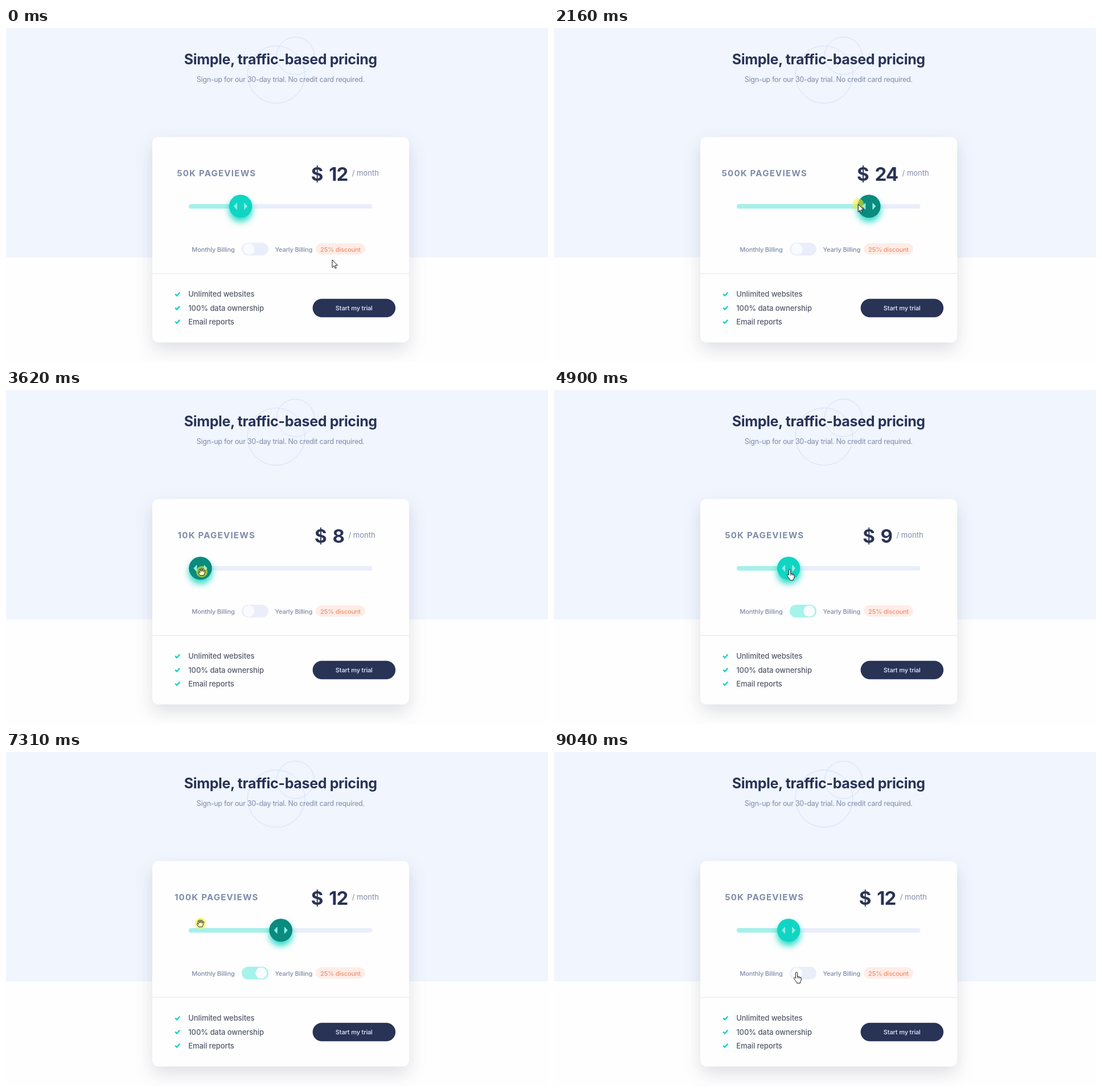
Write an HTML page that moves like this. It is 952x588 px and loops after 9700 ms.

```html
<!DOCTYPE html>
<html lang="en">
<head>
<meta charset="utf-8">
<title>Pricing slider</title>
<style>
  html, body { margin: 0; width: 100%; height: 100%; overflow: hidden; background: #fefefe; }
  svg { display: block; width: 952px; height: 588px; font-family: Inter, "Open Sans", sans-serif; }
  text { fill: #7f8baa; white-space: pre; }
  .mid { text-anchor: middle; }
  .title { font-size: 25px; font-weight: 700; letter-spacing: -.36px; fill: #293356; }
  .sub { font-size: 12.5px; letter-spacing: -.27px; }
  .views { font-size: 15px; font-weight: 700; letter-spacing: 1.25px; }
  .price { font-size: 33px; font-weight: 700; letter-spacing: -1px; word-spacing: 4px; fill: #293356; }
  .per { font-size: 13px; font-weight: 400; letter-spacing: 0; word-spacing: 0; fill: #7f8baa; }
  .small { font-size: 11px; font-weight: 500; letter-spacing: -.15px; }
  .feature { font-size: 13px; font-weight: 500; letter-spacing: -.09px; fill: #555a6b; }
  .ring { fill: none; stroke: #d6e0f4; }
  .check { fill: none; stroke: #10d5c2; stroke-width: 2.4; }
  .card { fill: #fefefe; filter: drop-shadow(0 13px 15px rgba(45, 52, 82, .15)); }
  #disc { fill: #10d5c2; filter: drop-shadow(0 7px 6px rgba(16, 213, 194, .9)); }
  #thumb path { fill: #8ceee4; }
  #thumb.down #disc { fill: #0b8a7e; }
  #cursor path { fill: #fff; stroke: #15171f; stroke-width: 1; stroke-linejoin: round; }
  #cursor #grab { fill: #fffcb8; stroke-width: .9; }
  #cursor .line { fill: none; stroke-width: .8; }
</style>
</head>
<body>
<svg viewBox="0 0 952 588">
  <rect width="952" height="588" fill="#fefefe"/>
  <rect width="952" height="404" fill="#f0f5fe"/>
  <circle class="ring" cx="474.5" cy="82" r="50.5"/>
  <circle class="ring" cx="508.3" cy="49" r="33"/>
  <text class="title mid" x="482.3" y="63.7">Simple, traffic-based pricing</text>
  <text class="sub mid" x="482.2" y="95">Sign-up for our 30-day trial. No credit card required.</text>

  <rect class="card" x="257" y="192" width="451" height="361.5" rx="10"/>
  <rect x="257" y="431.5" width="451" height="1.2" fill="#e8ebf1"/>

  <text class="views mid" id="views" x="369.8" y="261"></text>
  <text class="price mid" x="595.4" y="268.7"><tspan id="price"></tspan><tspan class="per" dx="7.5" dy="-9">/ month</tspan></text>

  <rect x="321" y="310" width="322.5" height="8" rx="4" fill="#eaeefb"/>
  <rect id="fill" x="321" y="310" height="8" rx="4" fill="#a5f1ea"/>
  <g id="thumb">
    <circle id="disc" r="20.3"/>
    <path d="M-12 0L-7 -5.6Q-6 -6 -6 -5V5Q-6 6 -7 5.6ZM12 0L7 -5.6Q6 -6 6 -5V5Q6 6 7 5.6Z"/>
  </g>

  <text class="small" x="326.3" y="393.6">Monthly Billing</text>
  <rect id="switch" x="414" y="378" width="47" height="22.6" rx="11.3"/>
  <circle id="knob" cy="389.3" r="10" fill="#fafbff"/>
  <text class="small" x="472.5" y="393.6">Yearly Billing</text>
  <rect x="544" y="379" width="87" height="20" rx="10" fill="#feece7"/>
  <text class="small mid" x="587.5" y="393.6" style="fill:#f0906c">25% discount</text>

  <g id="features"></g>
  <rect x="538.6" y="476.8" width="145.5" height="32.5" rx="16.2" fill="#293356"/>
  <text class="small mid" x="611.3" y="497" style="fill:#e6eeff">Start my trial</text>

  <g id="cursor">
    <circle id="press" r="10" fill="#fff01e" opacity=".56"/>
    <path id="arrow" d="M0 0V13.6L3.2 10.6 5.2 15.2 7.2 14.4 5.3 9.9H9.4Z"/>
    <g id="point">
      <path d="M-1.6 1.4a1.6 1.6 0 0 1 3.2 0V7.2l1.9 .4 1.8 .5 1.7 .6q1.6 .6 1.4 2.6l-.6 3.6-1.4 2.2V19H.6v-1.4l-2.6-3-2.6-4.2q-.4-1.6 1-1.8 1 0 2 1.6Z"/>
      <path class="line" d="M1.6 7v3.6M4 7.8v3M6.2 8.6v2.6"/>
    </g>
    <path id="grab" d="M-3.2 6.5L-6.2 1.8q-.4-1.6 1-1.6l2 1.9-1.6-5.2q0-1.6 1.5-1.4l1.8 4-.3-5q.8-1.4 1.9 0l.7 4.8 1-4.6q1.2-1 1.8 .4l-.4 5 1.5-2.8q1.5-.5 1.5 1l-1.8 5.2-1 3Z"/>
  </g>
</svg>
<script>
const LOOP = 9700, STEP = 70, FLIP = 220, LAG = 100, ARROW_END = 2300;
const TRACK = 341.5, GAP = 70.6;
const $ = id => document.getElementById(id);

const plans = [["10K", 8], ["50K", 12], ["100K", 16], ["500K", 24], ["1M", 36]];
const knobSpots = { thumb: [414, 316], off: [426, 388], on: [442, 390] };

// Where the pointer slows down: time, x, y.
const rests = [
  [700, 573, 408], [1180, 480, 254], [1610, ...knobSpots.thumb], [1740, ...knobSpots.thumb],
  [2050, 531, 310], [2510, 632, 316], [2650, 628, 316], [3530, 344, 320], [3820, 344, 320],
  [4030, ...knobSpots.thumb], [4130, ...knobSpots.thumb], [4450, ...knobSpots.on], [4660, ...knobSpots.on],
  [4870, ...knobSpots.thumb], [4950, ...knobSpots.thumb], [5300, 555, 316], [5400, 555, 316],
  [5700, ...knobSpots.on], [6130, ...knobSpots.on], [6480, 553, 318], [6900, 716, 322],
  [7400, 278, 298], [7790, 341, 318], [8140, 550, 316], [8420, ...knobSpots.thumb], [8630, ...knobSpots.off]
];
const drags = [[1610, 4130], [4950, 5400], [6480, 8450]];
const clicks = [4520, 5780, 6130, 8820];

const clamp = (v, lo, hi) => Math.min(hi, Math.max(lo, v));
const mix = (a, b, k) => a + (b - a) * k;
const ease = k => k * k * (3 - 2 * k);

$("features").innerHTML = ["Unlimited websites", "100% data ownership", "Email reports"].map((name, i) => {
  const y = 473.4 + 24.2 * i;
  return `<path class="check" d="M297.2 ${y - 5}l2.8 2.8 5.3-5.7"/><text class="feature" x="320.3" y="${y}">${name}</text>`;
}).join("");

function pointer(t) {
  const next = rests.findIndex(r => r[0] > t);
  if (next <= 0) return rests.at(next).slice(1);
  const [t0, x0, y0] = rests[next - 1], [t1, x1, y1] = rests[next];
  const k = ease((t - t0) / (t1 - t0));
  return [mix(x0, x1, k), mix(y0, y1, k)];
}

// The thumb snaps to the plan nearest the pointer, a moment late.
function planAt(t) {
  const [from, to] = drags.findLast(d => d[0] <= t) ?? drags[0];
  const [x] = pointer(clamp(t - LAG, from, to));
  return clamp(Math.round((x - TRACK) / GAP), 0, plans.length - 1);
}

function drawCursor(t, down) {
  const shape = t < ARROW_END ? "arrow" : down ? "grab" : "point";
  $("cursor").setAttribute("transform", `translate(${pointer(t)})`);
  for (const id of ["arrow", "point", "grab"]) $(id).style.display = id === shape ? "" : "none";
  $("press").style.display = down ? "" : "none";
}

function drawSlider(t, yearly, down) {
  const plan = planAt(t);
  const [views, cost] = plans[plan];
  const x = TRACK + GAP * plan;
  $("views").textContent = views + " PAGEVIEWS";
  $("price").textContent = "$ " + cost * (yearly ? .75 : 1);
  $("fill").setAttribute("width", x - 321);
  $("thumb").setAttribute("transform", `translate(${x} 313.8)`);
  $("thumb").classList.toggle("down", down);
}

function drawSwitch(t, since, yearly) {
  const p = ease(clamp((t - since) / FLIP, 0, 1));
  const k = yearly ? p : 1 - p;
  const off = [234, 238, 251], on = [165, 243, 235];
  $("switch").setAttribute("fill", `rgb(${off.map((c, i) => Math.round(mix(c, on[i], k)))})`);
  $("knob").setAttribute("cx", mix(426.5, 448.3, k));
}

function draw() {
  const now = performance.now() % LOOP;
  const t = Math.floor(now / STEP) * STEP;
  const down = drags.some(([from, to]) => t >= from && t < to);
  const done = clicks.filter(c => c <= now);
  const yearly = done.length % 2 === 1;
  drawSlider(t, yearly, down);
  drawSwitch(now, done.at(-1) ?? -FLIP, yearly);
  drawCursor(t, down);
  requestAnimationFrame(draw);
}
draw();
</script>
</body>
</html>
```
